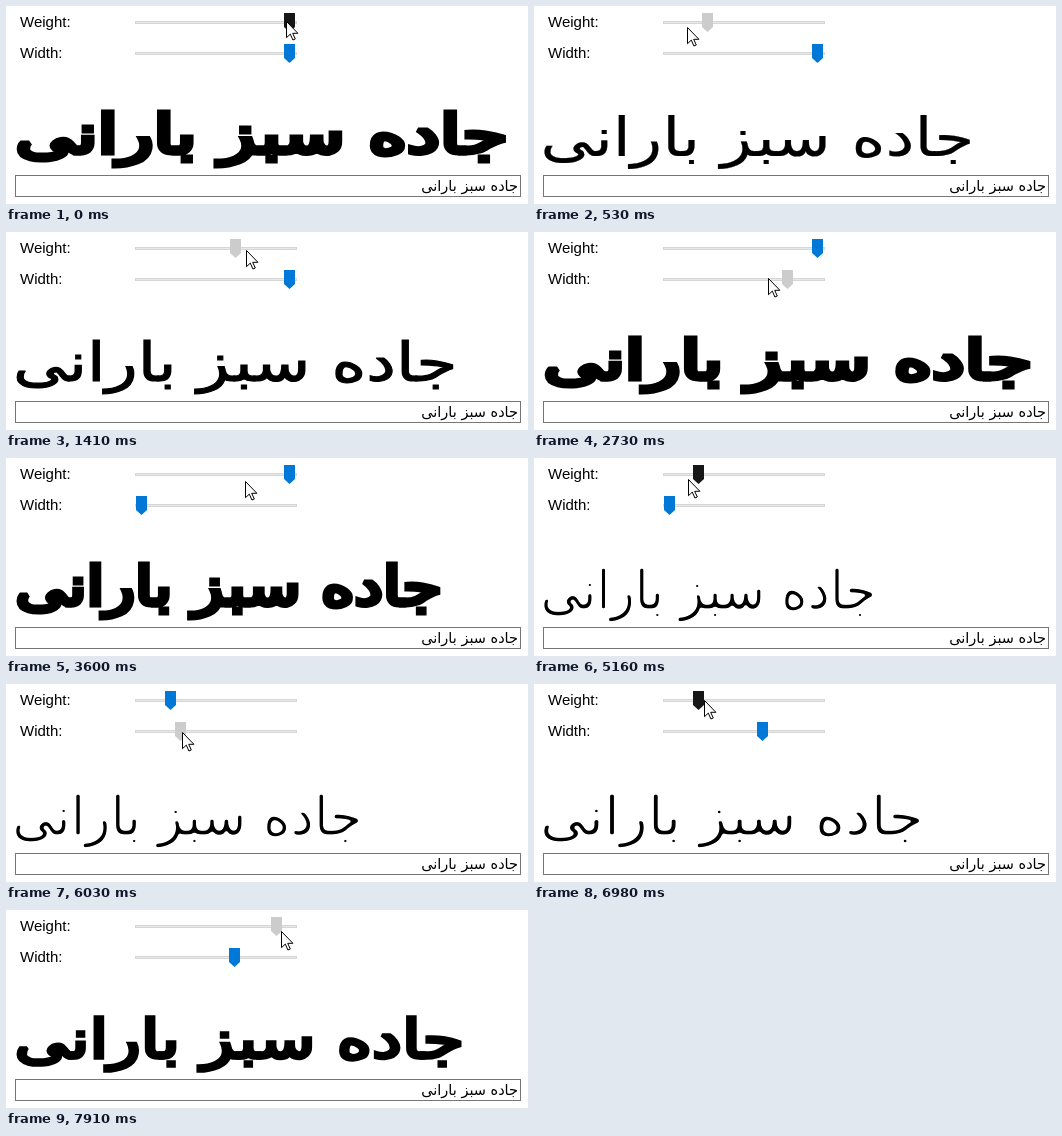
An HTML page that plays this animation: 522x198 px, repeating every 7990 ms.

```html
<!DOCTYPE html>
<html lang="fa">
<head>
<meta charset="utf-8">
<style>
  html, body { margin: 0; width: 100%; height: 100%; overflow: hidden; background: #fff; }
  svg { display: block; }
  .label { font: 15px "Liberation Sans", Arial, sans-serif; }
  .sample { font: 54px "DejaVu Sans", sans-serif; stroke: #000; stroke-miterlimit: 2; }
  .entry { font: 14.5px "DejaVu Sans", sans-serif; text-anchor: end; }
  .track { fill: #e7eaea; stroke: #d6d6d6; }
</style>
</head>
<body>
<svg width="522" height="198" viewBox="0 0 522 198">
  <defs>
    <path id="knob" d="M-5.5 0h11v14L0 19l-5.5-5z"/>
    <filter id="thin">
      <feGaussianBlur stdDeviation="1.2"/>
      <feComponentTransfer><feFuncA id="cut" type="linear" slope="4"/></feComponentTransfer>
    </filter>
  </defs>
  <text class="label" x="14" y="21">Weight:</text>
  <text class="label" x="14" y="52">Width:</text>
  <rect class="track" x="129.5" y="15.5" width="161" height="2"/>
  <rect class="track" x="129.5" y="46.5" width="161" height="2"/>
  <use id="weight" href="#knob"/>
  <use id="width" href="#knob"/>
  <text class="sample" id="sample">جاده سبز بارانی</text>
  <rect x="9.5" y="169.5" width="505" height="21" fill="#fff" stroke="#767676"/>
  <text class="entry" x="512" y="185">جاده سبز بارانی</text>
  <path id="cursor" d="M-.5.5v16.2l3.8-3.6 2.6 5.9 2.4-1-2.6-5.7h5.2z" fill="#fff" stroke="#000"/>
</svg>
<script>
const LOOP = 7990, KNOB_LAG = 60, TEXT_LAG = 140;
const REST = 230, TRAVEL = 700;
const MIN_X = 135.5, MAX_X = 283.5, STEM = 5;
const TOP = { weight: 7, width: 38 };
const $ = id => document.getElementById(id);
const sample = $('sample');

// Each drag moves the pointer steadily between two x positions.
const drag = (slider, start, end, from, to) => ({ slider, start, end, from, to });
const drags = [
  drag('weight', 80, 545, 281, 150),
  drag('weight', 1010, 1590, 150, 281),
  drag('width', 2560, 3210, 281, 108),
  drag('weight', 4310, 4930, 274, 155),
  drag('width', 5700, 6350, 130, 223),
  drag('weight', 7360, 7830, 170, 276)
];

const clamp = (v, low, high) => Math.min(high, Math.max(low, v));
const mix = (a, b, f) => a + (b - a) * f;
const easeOut = f => f < 1 ? 1 - 2 ** (-10 * f) : 1;

// The hand sinks a little while it drags.
function dragPoint(d, t) {
  const f = clamp((t - d.start) / (d.end - d.start), 0, 1);
  return { x: mix(d.from, d.to, f), y: TOP[d.slider] + 8 + 6 * f * f };
}

// After a drag and a rest, the pointer glides to where the next drag begins.
function pointer(t) {
  const i = Math.max(0, drags.findLastIndex(d => d.start <= t));
  const here = dragPoint(drags[i], t), next = drags[i + 1];
  if (!next) return here;
  const goal = dragPoint(next, next.start);
  const f = easeOut(Math.max(0, (t - drags[i].end - REST) / TRAVEL));
  return { x: mix(here.x, goal.x, f), y: mix(here.y, goal.y, f) };
}

function knobX(slider, t) {
  return drags
    .filter(d => d.slider === slider && d.start <= t)
    .reduce((x, d) => clamp(x + dragPoint(d, t).x - d.from, MIN_X, MAX_X), MAX_X);
}

const axis = (slider, t) => (knobX(slider, t) - MIN_X) / (MAX_X - MIN_X);

function drawSlider(slider, t) {
  const x = knobX(slider, t - KNOB_LAG), top = TOP[slider], mouse = pointer(t);
  const pressed = drags.some(d => d.slider === slider && t > d.start && t < d.end + 100);
  const hover = Math.abs(mouse.x - x) < 10 && mouse.y >= top && mouse.y <= top + 19;
  $(slider).setAttribute('transform', `translate(${Math.round(x - .5) + .5} ${top})`);
  $(slider).setAttribute('fill', pressed ? '#ccc' : hover ? '#171717' : '#0078d7');
}

const pen = document.createElement('canvas').getContext('2d');
pen.font = '54px "DejaVu Sans", sans-serif';
const ink = pen.measureText(sample.textContent);
const inkWidth = ink.actualBoundingBoxLeft + ink.actualBoundingBoxRight;

// Heavy weights add an outline, light ones shave the edges with the filter.
function drawSample(weight, width) {
  const grow = 1.9 + 8.2 * weight - STEM;
  const thin = Math.max(0, -grow / 2);
  const span = 491 - 66 * (1 - width) - (120 - 11 * width) * (1 - weight);
  const scale = span / (inkWidth + grow);
  const x = 10 + (ink.actualBoundingBoxLeft + grow / 2) * scale;
  const y = 163 - ink.actualBoundingBoxDescent - grow / 2;
  sample.setAttribute('transform', `translate(${x} ${y}) scale(${scale} 1)`);
  sample.setAttribute('stroke-width', Math.max(0, grow));
  sample.setAttribute('filter', thin ? 'url(#thin)' : 'none');
  $('cut').setAttribute('intercept', .5 - 4 * (.5 + .28 * thin));
}

function draw(now) {
  const t = now % LOOP, mouse = pointer(t);
  drawSlider('weight', t);
  drawSlider('width', t);
  drawSample(axis('weight', t - TEXT_LAG), axis('width', t - TEXT_LAG));
  $('cursor').setAttribute('transform', `translate(${Math.round(mouse.x)} ${Math.round(mouse.y)})`);
  requestAnimationFrame(draw);
}
draw(performance.now());
</script>
</body>
</html>
```
